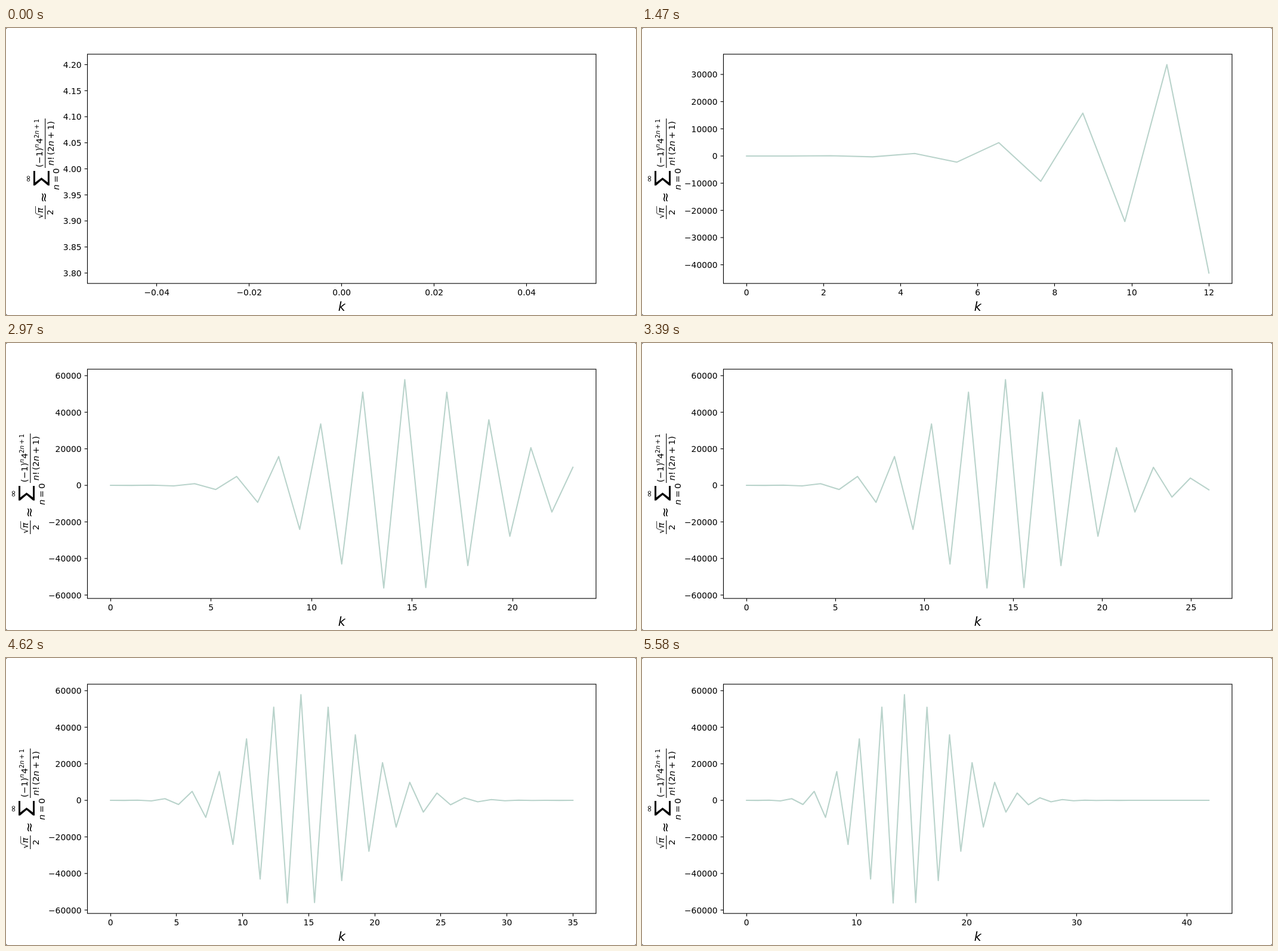
An HTML page with a canvas for the animation above (5640 ms loop, 1056 by 482 pixels).

```html
<!DOCTYPE html>
<html lang="en">
<head>
<meta charset="utf-8">
<title>Partial sums</title>
<style>
  html, body { margin: 0; width: 100%; height: 100%; overflow: hidden; background: #fff; }
  canvas { display: block; width: 1056px; height: 482px; }
</style>
</head>
<body>
<canvas id="c" width="1056" height="482"></canvas>
<script>
const ctx = document.getElementById('c').getContext('2d');
const LOOP = 5640, TICK = 30;
const BOX = { x: 136.5, y: 44, w: 852.5, h: 385 };
const BIG = 20.83, MID = 14.58, TINY = 10.2, LABEL = 13.89;

// When each k appears, in units of TICK
const starts = [0, 1, 6, 11, 16, 21, 26, 30, 34, 40, 44, 49, 54, 59, 63, 68, 72, 77, 82, 86, 91,
  95, 99, 104, 108, 113, 117, 122, 126, 130, 136, 140, 144, 148, 154, 158, 162, 167, 171, 176, 181, 186];

// Partial sums of (-1)^n 4^(2n+1) / (n! (2n+1))
const sums = [4];
for (let n = 1, p = 4; n < starts.length; n++) {
  p *= -16 / n;
  sums.push(sums[n - 1] + p / (2 * n + 1));
}

const snap = v => Math.round(v - 0.5) + 0.5;

function font(size, italic) {
  ctx.font = `${italic ? 'italic ' : ''}${size}px "DejaVu Sans", sans-serif`;
}

function text(str, x, y, size, align = 'left', italic = false) {
  font(size, italic);
  ctx.textAlign = align;
  ctx.fillText(str, x, y);
}

function line(x1, y1, x2, y2, width = 1.11) {
  ctx.lineWidth = width;
  ctx.beginPath();
  ctx.moveTo(x1, y1);
  ctx.lineTo(x2, y2);
  ctx.stroke();
}

// Limits with a 5% margin; a single value gets a small range around it
function limits(values) {
  let lo = Math.min(...values), hi = Math.max(...values);
  if (lo === hi) {
    const d = Math.abs(lo) * 0.05 || 0.05;
    lo -= d;
    hi += d;
  }
  const m = (hi - lo) * 0.05;
  return [lo - m, hi + m];
}

// Round tick values, at most nine intervals
function ticks([lo, hi]) {
  const raw = (hi - lo) / 9, mag = 10 ** Math.floor(Math.log10(raw));
  const step = mag * [1, 2, 2.5, 5, 10].find(s => s * mag >= raw);
  let digits = 0;
  while (Math.abs(step * 10 ** digits - Math.round(step * 10 ** digits)) > 1e-6) digits++;
  const list = [];
  for (let i = Math.ceil(lo / step - 1e-9); i * step <= hi; i++) {
    const v = i * step;
    list.push({ v, label: (i < 0 ? '\u2212' : '') + Math.abs(v).toFixed(digits) });
  }
  return list;
}

// Math text: italic letters, spaced operators
function formula(str, x, y, size) {
  for (const ch of str) {
    const pad = '+='.includes(ch) ? size * 0.2 : 0;
    text(ch, x + pad, y, size, 'left', 'nπ'.includes(ch));
    x += ctx.measureText(ch).width + 2 * pad + (ch === '!' ? size / 6 : 0);
  }
  return x;
}

function yTitle(x) {
  ctx.save();
  ctx.translate(x, 321);
  ctx.rotate(-Math.PI / 2);

  formula('√π', 1, -8.2, MID);
  line(9.8, -20.9, 21.8, -20.9, 0.8);
  line(0, -4.7, 23, -4.7);
  text('2', 11.5, 9, MID, 'center');
  text('≈', 36.5, 0, BIG, 'center');

  const sigma = [[0, 0], [24.5, 0], [24.5, 3], [5.3, 3], [13.3, 13.5], [5.3, 24], [24.5, 24],
    [24.5, 27], [0, 27], [0, 24.4], [9.2, 13.5], [0, 2.6]];
  ctx.beginPath();
  for (const [u, v] of sigma) ctx.lineTo(56.5 + u, v - 24.5);
  ctx.fill();
  text('∞', 68, -28.5, MID, 'center');
  formula('n=0', 49, 19, MID);

  let u = formula('(\u22121)', 87, -9.6, MID);
  u = formula('n', u, -15.7, TINY);
  u = formula('4', u + 0.5, -9.6, MID);
  formula('2n+1', u, -15.7, TINY);
  line(86, -4.7, 169, -4.7);
  formula('n!(2n+1)', 90, 9.6, MID);
  ctx.restore();
}

function draw(k) {
  // White page with slightly rounded corners
  ctx.fillStyle = '#444';
  ctx.fillRect(0, 0, 1056, 482);
  ctx.fillStyle = '#fff';
  ctx.beginPath();
  ctx.roundRect(0, 0, 1056, 482, 3);
  ctx.fill();

  const ys = sums.slice(0, k);
  const xs = ys.map((_, i) => k > 1 ? i * k / (k - 1) : 0);
  const xLim = limits(xs), yLim = limits(ys);
  const px = v => BOX.x + BOX.w * (v - xLim[0]) / (xLim[1] - xLim[0]);
  const py = v => BOX.y + BOX.h * (yLim[1] - v) / (yLim[1] - yLim[0]);
  const bottom = BOX.y + BOX.h;

  if (k > 1) {
    ctx.strokeStyle = '#b9d3cb';
    ctx.lineWidth = 2.08;
    ctx.lineJoin = 'round';
    ctx.lineCap = 'square';
    ctx.beginPath();
    xs.forEach((x, i) => ctx.lineTo(px(x), py(ys[i])));
    ctx.stroke();
  }

  ctx.strokeStyle = ctx.fillStyle = '#000';
  ctx.lineCap = 'butt';
  ctx.lineJoin = 'miter';
  ctx.lineWidth = 1.11;
  ctx.strokeRect(BOX.x, BOX.y, BOX.w, BOX.h);

  for (const { v, label } of ticks(xLim)) {
    const x = px(v);
    line(snap(x), bottom, snap(x), bottom + 4.86);
    text(label, x, bottom + 20.4, LABEL, 'center');
  }
  let widest = 0;
  for (const { v, label } of ticks(yLim)) {
    const y = py(v);
    line(BOX.x - 4.86, y, BOX.x, y);
    text(label, BOX.x - 9.8, y + 5.3, LABEL, 'right');
    widest = Math.max(widest, ctx.measureText(label).width);
  }

  text('k', BOX.x + BOX.w / 2, 475, BIG, 'center', true);
  yTitle(BOX.x - 9.8 - widest - 25.4);
}

function frame(now) {
  const t = now % LOOP / TICK;
  draw(starts.filter(s => s <= t).length);
  requestAnimationFrame(frame);
}
requestAnimationFrame(frame);
</script>
</body>
</html>
```
